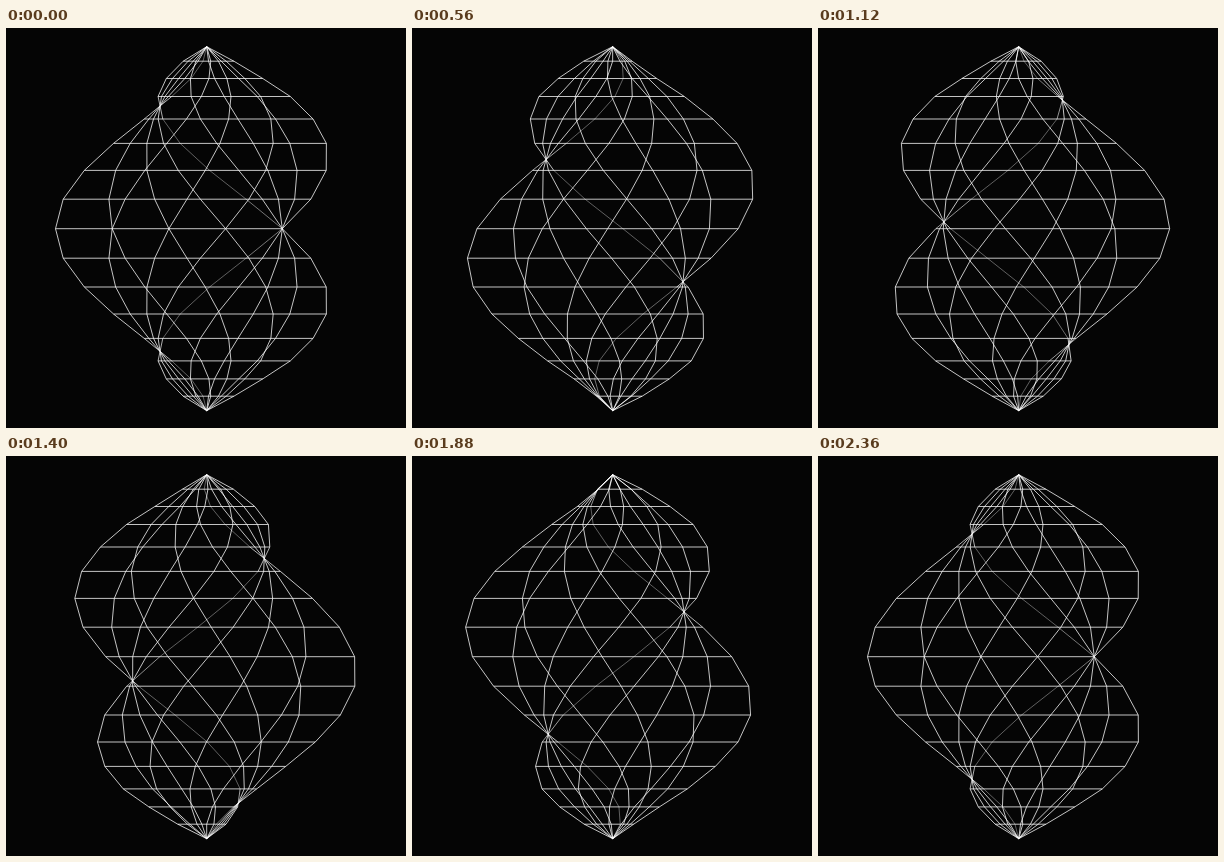
Write an HTML page with a canvas that moves like this. It is 400 px wide and 400 px high and loops after 2400 ms.

```html
<!DOCTYPE html>
<html lang="en">
<head>
<meta charset="utf-8">
<title>Twisting wireframe</title>
<style>
  html, body { margin: 0; width: 100%; height: 100%; overflow: hidden; background: #050505; }
  canvas { display: block; width: 400px; height: 400px; }
</style>
</head>
<body>
<canvas id="stage" width="400" height="400"></canvas>
<script>
const ctx = document.getElementById("stage").getContext("2d");

const CENTER = 200.7;
const RADIUS = 151.2;
const STEP_MS = 40;
const STEPS = 60;
const SIDES = 3;
const SPLITS = 4;
const SIDE_ANGLE = 2 * Math.PI / SIDES;
const LINE_ALPHA = 0.76;

// Heights of the rings above the equator, mirrored below it.
const HEIGHTS = [0, 29.5, 58.3, 85.3, 109.7, 132.2, 150.2, 167.5, 182];
const HALF = HEIGHTS.length - 1;

// Half a turn of twist from pole to pole.
const TWIST = Math.PI / 2 / HEIGHTS[HALF];

const rings = [];
for (let i = -HALF; i <= HALF; i++) {
  const dy = Math.sign(i) * HEIGHTS[Math.abs(i)];
  rings.push({ dy, y: CENTER + dy, r: RADIUS * Math.cos(i / HALF * Math.PI / 2) });
}

const clamp01 = v => Math.min(1, Math.max(0, v));

function line(x1, y1, x2, y2, alpha) {
  ctx.globalAlpha = alpha;
  ctx.beginPath();
  ctx.moveTo(x1, y1);
  ctx.lineTo(x2, y2);
  ctx.stroke();
}

// One third of a turn per loop, slightly slower at both ends.
function rotation(u) {
  const a = 2 * Math.PI * u;
  return SIDE_ANGLE * (u - 0.0188 * Math.sin(a) - 0.0046 * Math.sin(2 * a));
}

const cornerAngle = (ring, side, turn) =>
  Math.PI + side * SIDE_ANGLE + TWIST * ring.dy - turn;

function pointX(ring, side, part, turn) {
  const a = Math.cos(cornerAngle(ring, side, turn));
  const b = Math.cos(cornerAngle(ring, side + 1, turn));
  return CENTER + ring.r * (a + (b - a) * part);
}

// Corner edges fade while they pass across the middle of the view.
function cornerAlpha(top, bottom, side, turn) {
  const angle = (cornerAngle(top, side, turn) + cornerAngle(bottom, side, turn)) / 2;
  const visible = clamp01((Math.abs(Math.cos(angle)) - 0.34) / 0.2);
  return 0.36 + (LINE_ALPHA - 0.36) * visible;
}

function draw(turn) {
  ctx.globalAlpha = 1;
  ctx.fillStyle = "#050505";
  ctx.fillRect(0, 0, 400, 400);
  ctx.strokeStyle = "#fff";
  ctx.lineWidth = 1;

  for (const ring of rings) {
    const xs = [0, 1, 2].map(side => pointX(ring, side, 0, turn));
    line(Math.min(...xs), ring.y, Math.max(...xs), ring.y, LINE_ALPHA);
  }

  for (let side = 0; side < SIDES; side++) {
    for (let split = 0; split < SPLITS; split++) {
      const part = split / SPLITS;
      for (let i = 1; i < rings.length; i++) {
        const top = rings[i - 1], bottom = rings[i];
        const alpha = split ? LINE_ALPHA : cornerAlpha(top, bottom, side, turn);
        line(pointX(top, side, part, turn), top.y,
             pointX(bottom, side, part, turn), bottom.y, alpha);
      }
    }
  }
}

function tick() {
  const step = Math.floor(performance.now() / STEP_MS) % STEPS;
  draw(rotation(step / (STEPS - 1)));
  requestAnimationFrame(tick);
}
tick();
</script>
</body>
</html>
```
